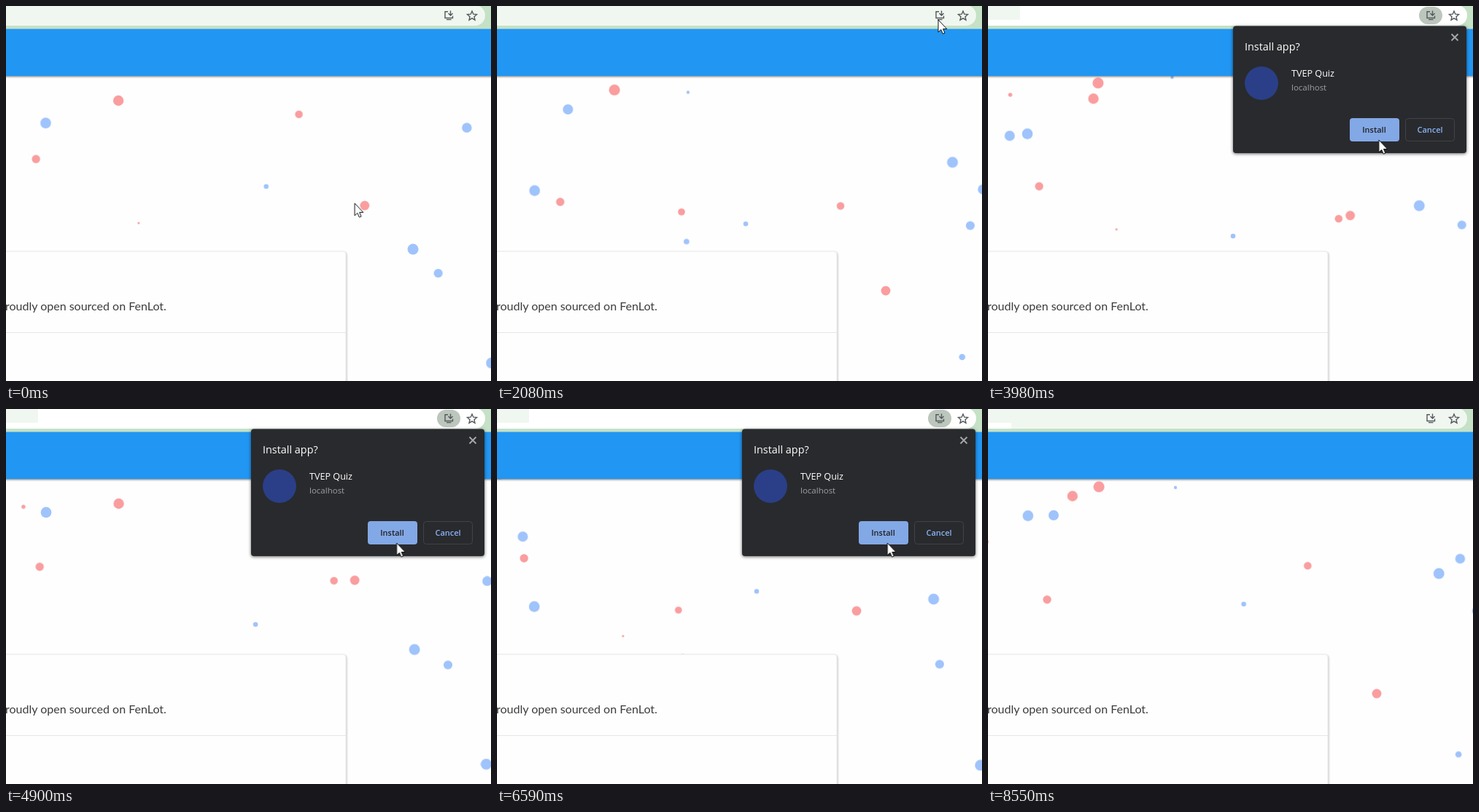
Write an HTML page that moves like this. It is 665 px wide and 515 px high and loops after 8650 ms.

```html
<!DOCTYPE html>
<html lang="en">
<head>
<meta charset="utf-8">
<title>Install app prompt</title>
<style>
  html, body { margin: 0; width: 100%; height: 100%; overflow: hidden; background: #fefefe; }
  svg { display: block; }
  text { font-family: "Open Sans", "Noto Sans", sans-serif; }
  .card { filter: drop-shadow(1px 1px 1px rgba(0, 0, 0, .22)); }
  .header { filter: drop-shadow(0 1px 1.5px rgba(0, 0, 0, .55)); }
  .panel { filter: drop-shadow(0 1px 2px rgba(0, 0, 0, .6)); }
  .button { font-size: 11px; font-weight: 600; text-anchor: middle; }
</style>
</head>
<body>
<svg width="665" height="515" viewBox="0 0 665 515">
  <rect width="665" height="515" fill="#fefefe"/>
  <g id="dots"></g>

  <rect class="card" x="-20" y="337" width="486" height="220" rx="4" fill="#fefefe" stroke="#ececec"/>
  <path d="M0 448.5H466" stroke="#e6e6e6"/>
  <text x="-1" y="418" fill="#3c3c3c" style="font: 16px Lato, sans-serif">roudly open sourced on FenLot.</text>

  <rect class="header" x="-10" y="31" width="685" height="65" fill="#2196f3"/>
  <rect width="665" height="31.5" fill="#c5e1c6"/>
  <rect id="bar" x="-20" y="-1" width="677" height="28" rx="14"/>
  <rect id="patch"/>
  <rect id="chip" x="591" y="1" width="32" height="24" rx="12" fill="#bcc6bd"/>
  <g fill="none" stroke="#55595c" stroke-width="1.4">
    <path d="M606 7.8h-4v8.7h10.5v-3M604 18.6h6.5M609.5 6.5v6M606.5 10l3 3 3-3"/>
    <path d="M639 7l1.8 4.2 4.7.4-3.5 3.1 1 4.5-4-2.4-4 2.4 1-4.5-3.5-3.1 4.7-.4z"/>
  </g>

  <g id="dialog">
    <rect class="panel" x="336" y="27.5" width="320" height="174.5" rx="4" fill="#292a2d"/>
    <path d="M635.5 38.5l9 9m0-9l-9 9" stroke="#a5a8ac" stroke-width="1.8"/>
    <text x="352" y="61" font-size="14.4" fill="#fff">Install app?</text>
    <circle cx="375" cy="106" r="23" fill="#2a3f87"/>
    <text x="416" y="97" font-size="12.6" fill="#fff">TVEP Quiz</text>
    <text x="416" y="116" font-size="11.5" fill="#9aa0a6">localhost</text>
    <rect id="install" x="496" y="154" width="68" height="32" rx="4"/>
    <text class="button" x="529.5" y="174" fill="#202124">Install</text>
    <rect x="572.5" y="154.5" width="67" height="31" rx="4" fill="none" stroke="#3f4347"/>
    <text class="button" x="606" y="174" fill="#8ab4f8">Cancel</text>
  </g>

  <path id="cursor" d="M0 0v17l3.8-3.6 2.5 5.8 2.7-1.1-2.4-5.6h5.2z" fill="#fff" stroke="#111"/>
</svg>
<script>
const LOOP = 8650, OPEN = 2150, CLOSE = 6750, HOVER = 3070;
const LEAD = 7740; // the dots have drifted this long before the loop begins
const $ = id => document.getElementById(id);
const shift = (x, y) => `translate(${x}px, ${y}px)`;

function paused(el, frames, options) {
  const motion = el.animate(frames, { fill: "both", ...options });
  motion.pause();
  return motion;
}

// Dots leave x, y together and ease down by dx, dy and back, each at its own pace.
// They are listed from large to small.
const colors = "rbbbrbbrbrrrbbbrbr";
const drifts = [
  [111, 68, 54, 51, 3495],
  [651, 485, 72, 26, 3348],
  [631, 203, -73, 131, 2590],
  [55, 140, -4, 134, 2077],
  [-5, 87, 167, 45, 2455],
  [114, 133, -164, 88, 2600],
  [631, 165, 46, 114, 3690],
  [476, 229, 57, 162, 3273],
  [670, 277, -80, 93, 2695],
  [34, 201, 55, 71, 3440],
  [399, 144, 90, 163, 3650],
  [246, 272, 88, 136, 2340],
  [766, 348, -134, 140, 3122],
  [260, 323, -54, 170, 2480],
  [357, 247, -22, 72, 3725],
  [31, 121, -59, 110, 2980],
  [226, 41, 38, 82, 3465],
  [184, 295, -50, 75, 1868]
];
const dots = drifts.map(([x, y, dx, dy, duration], i) => {
  const dot = document.createElementNS("http://www.w3.org/2000/svg", "circle");
  dot.setAttribute("r", 7.6 * Math.cos(0.08 * i));
  dot.setAttribute("fill", colors[i] === "r" ? "#fa9d9f" : "#9fc3fb");
  $("dots").append(dot);
  return paused(dot, { transform: [shift(x, y), shift(x + dx, y + dy)] },
    { duration, easing: "ease-in-out", direction: "alternate", iterations: Infinity });
});

// To the install icon, onto the button, then out at the bottom
const stops = [
  [0, 478, 271], [1160, 600, 54], [1700, 605, 19], [2250, 605, 19], [2560, 590, 42],
  [3200, 536, 184], [7450, 535, 184], [8150, 525, 520], [LOOP, 525, 520]
];
const cursor = paused($("cursor"),
  stops.map(([time, x, y]) => ({ offset: time / LOOP, transform: shift(x, y) })),
  { duration: LOOP });

function set(id, attributes) {
  for (const [key, value] of Object.entries(attributes)) $(id).setAttribute(key, value);
}

function draw(t) {
  for (const dot of dots) dot.currentTime = LEAD + t;
  cursor.currentTime = t;

  const open = t >= OPEN && t < CLOSE;
  for (const id of ["dialog", "chip"]) $(id).style.display = open ? "" : "none";
  set("bar", { fill: open ? "#fff" : "#f0f7f0" });
  set("install", { fill: t > HOVER ? "#83a8e6" : "#8ab4f8" });
  // Part of the address bar repaints late
  set("patch", open
    ? { y: 0, width: 44, height: 19, fill: "#f0f7f0" }
    : { y: 19, width: t < OPEN ? 0 : 32, height: 8, fill: "#fff" });
}

const start = performance.now();
function frame() {
  draw((performance.now() - start) % LOOP);
  requestAnimationFrame(frame);
}
frame();
</script>
</body>
</html>
```
